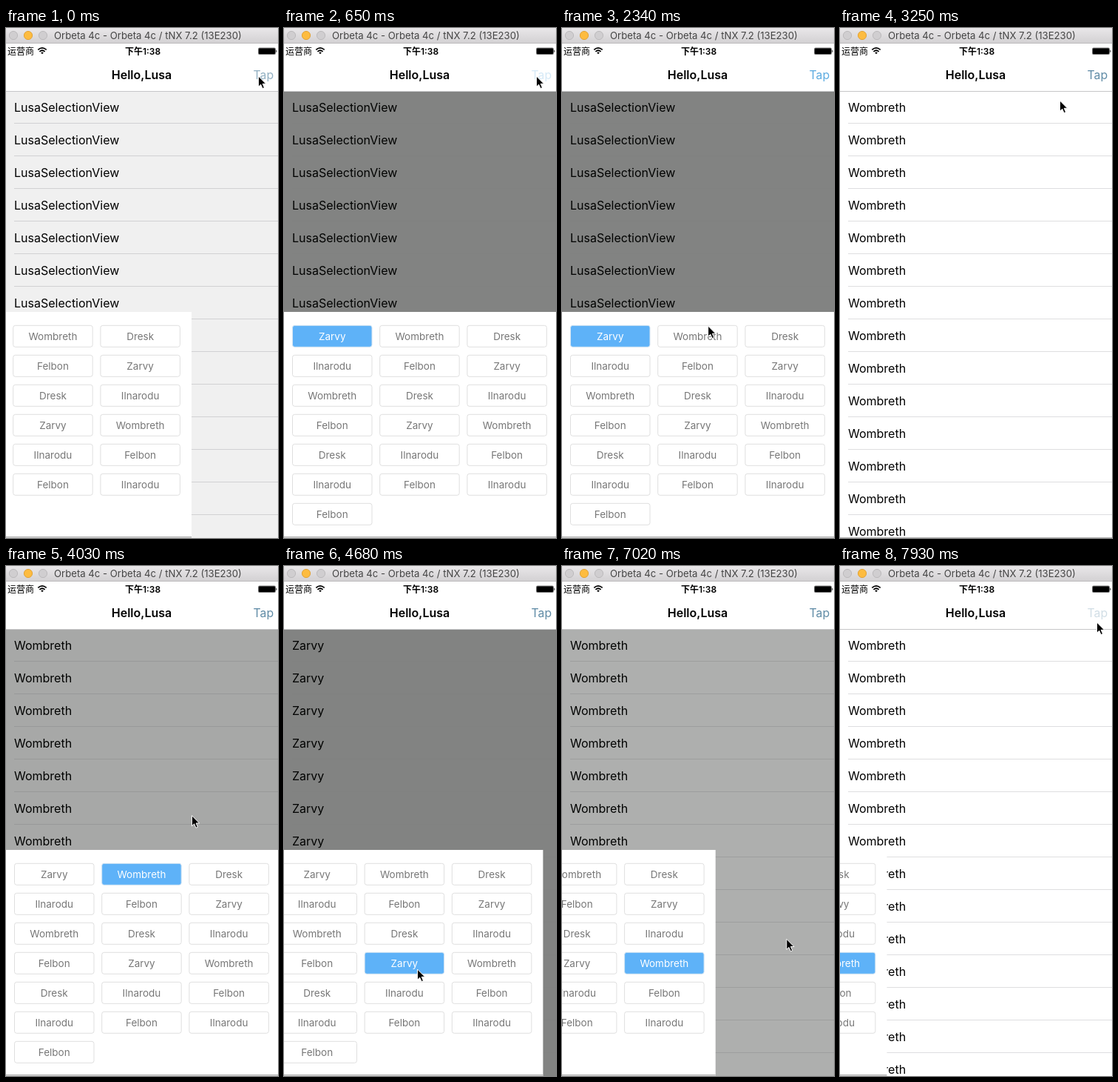
These frames come from a looping animation (368 px wide and 688 px high, 8000 ms). An HTML page:

```html
<!DOCTYPE html>
<html lang="zh">
<head>
<meta charset="utf-8">
<style>
html, body { margin: 0; width: 100%; height: 100%; overflow: hidden; background: #fff; }
svg { display: block; width: 368px; height: 688px; font-family: Inter, "Noto Sans CJK SC", "Noto Sans CJK", sans-serif; }
</style>
</head>
<body>
<svg id="stage" viewBox="0 0 368 688" xmlns="http://www.w3.org/2000/svg">
  <defs>
    <linearGradient id="chrome" x2="0" y2="1">
      <stop stop-color="#e9e7e9"/><stop offset="1" stop-color="#d2d0d2"/>
    </linearGradient>
  </defs>
  <rect width="368" height="688" fill="#fff"/>
  <g id="lines" fill="#dedee0"></g>
  <g id="rows" font-size="16"></g>
  <rect id="dim" y="86" width="368" height="602" fill="#000402"/>
  <rect id="edge" y="687" width="368" height="1" fill="#b4b4b4"/>
  <g id="panel">
    <rect y="383" width="371" height="305" fill="#fff"/>
    <rect y="686" width="371" height="1.5" fill="#adadad"/>
    <g id="cells" font-size="13.5" text-anchor="middle"></g>
  </g>
  <rect y="21" width="368" height="64" fill="#fff"/>
  <rect y="85" width="368" height="1" fill="#c6c6c8"/>
  <rect width="368" height="21" fill="url(#chrome)"/>
  <rect y="20" width="368" height="1" fill="#bdbbbd"/>
  <g stroke-width="1">
    <circle cx="10" cy="10" r="5.6" fill="#d0ced0" stroke="#bcbabc"/>
    <circle cx="30" cy="10" r="5.6" fill="#fdbc40" stroke="#e2a336"/>
    <circle cx="50" cy="10" r="5.6" fill="#d0ced0" stroke="#bcbabc"/>
  </g>
  <text x="65" y="15" font-size="13.15" fill="#454545">Orbeta 4c - Orbeta 4c / tNX 7.2 (13E230)</text>
  <text x="2" y="35.5" font-size="12">运营商</text>
  <g fill="none" stroke="#000" stroke-width="1.7">
    <path d="M43.3 29.4Q49 24.4 54.7 29.4M45.4 31.8Q49 28.7 52.6 31.8"/>
    <path d="M47.2 33.3Q49 31.8 50.8 33.3L49 35.3Z" fill="#000" stroke="none"/>
  </g>
  <text x="185" y="35.5" font-size="12" font-weight="600" text-anchor="middle">下午1:38</text>
  <rect x="341" y="26.5" width="24" height="9.5" rx="2" fill="#777"/>
  <rect x="342" y="27.5" width="22" height="7.5" rx="1"/>
  <path d="M365.4 29.3q2 2 0 4z"/>
  <text x="183.5" y="69" font-size="16" font-weight="600" text-anchor="middle">Hello,Lusa</text>
  <text id="tap" x="334.5" y="69" font-size="15.8">Tap</text>
  <path id="cursor" d="M0 0V14.2L3.2 11.2L5.6 16.6L8 15.5L5.7 10.3H10.2Z" stroke="#fff" stroke-width="1"/>
</svg>
<script>
const LOOP = 8000, SLIDE = 350, TRAVEL = 371;
const [W, D, F, Z, I] = ["Wombreth", "Dresk", "Felbon", "Zarvy", "Ilnarodu"];
const names = [Z, W, D, I, F, Z, W, D, I, F, Z, W, D, I, F, I, F, I, F];

const toggles = [[-216, 1], [690, 0], [1369, 1], [2760, 0], [3560, 1], [4631, 0], [5625, 1], [6860, 0], [7839, 1]];
const presses = [-270, 600, 1330, 3500, 5570, 7790];
const picks = [[-1000, 0, "LusaSelectionView"], [2680, 1, W], [4550, 10, Z], [6780, 11, W]];
const path = [
  [0, 341.5, 65], [1650, 341.5, 65], [2450, 190, 420], [2800, 190, 420],
  [3250, 297.5, 98], [3450, 344, 66], [3650, 344, 66], [4350, 180.5, 544],
  [4700, 180.5, 544], [5400, 344, 66], [5620, 344, 66], [5980, 361.5, 348],
  [6500, 300, 540], [6900, 300, 540], [7600, 347.5, 76], [8000, 347.5, 76]
];

const $ = id => document.getElementById(id);
const clamp = v => Math.min(1, Math.max(0, v));
const smooth = v => (v = clamp(v), v * v * (3 - 2 * v));
const latest = (list, t) => list.filter(e => e[0] <= t).pop();

function add(parent, tag, attrs, text = "") {
  const el = document.createElementNS("http://www.w3.org/2000/svg", tag);
  for (const key in attrs) el.setAttribute(key, attrs[key]);
  el.textContent = text;
  parent.append(el);
  return el;
}

const rows = [];
for (let i = 0; i < 14; i++) {
  add($("lines"), "rect", { x: 11, y: 128 + 44 * i, width: 357, height: 1 });
  rows.push(add($("rows"), "text", { x: 11, y: 112.5 + 44 * i }));
}

const cells = names.map((name, i) => {
  const x = 11.5 + 118.2 * (i % 3), y = 401.3 + 40 * Math.floor(i / 3);
  return {
    box: add($("cells"), "rect", { x, y, width: 107.5, height: 29, rx: 3 }),
    label: add($("cells"), "text", { x: x + 53.75, y: y + 19.2 }, name)
  };
});

function cursorAt(t) {
  const k = path.findIndex(p => p[0] > t);
  const a = path[k - 1], b = path[k];
  const e = smooth((t - a[0]) / (b[0] - a[0]));
  return [1, 2].map(j => a[j] + (b[j] - a[j]) * e);
}

function draw(t) {
  const [start, open] = latest(toggles, t);
  const age = t - start;
  const slide = smooth(age / SLIDE);
  const shown = open ? slide : 1 - slide;
  const shade = open ? clamp((age - 165) / 435) : 1 - clamp((age - 60) / 290);
  $("panel").setAttribute("transform", `translate(${TRAVEL * (shown - 1)} 0)`);
  $("dim").setAttribute("opacity", 0.49 * shade);
  $("lines").setAttribute("opacity", 1 - 0.9 * shade ** 3);
  $("edge").setAttribute("opacity", shown ? 0 : 1);

  const [, selected, title] = latest(picks, t);
  for (const row of rows) row.textContent = title;
  cells.forEach(({ box, label }, i) => {
    const on = i === selected;
    box.setAttribute("fill", on ? "#5eb2f8" : "#fff");
    box.setAttribute("stroke", on ? "#d3e4f2" : "#dfdfdf");
    label.setAttribute("fill", on ? "#fff" : "#777");
  });

  const since = t - presses.filter(p => p <= t).pop();
  $("tap").setAttribute("fill", t > 500 && t < 2680 ? "#5cabe0" : "#5f8ba6");
  $("tap").setAttribute("opacity", 0.25 + 0.75 * clamp((since - 130) / 250));
  $("cursor").setAttribute("transform", `translate(${cursorAt(t)})`);
}

const origin = performance.now();
function tick() {
  draw((performance.now() - origin) % LOOP);
  requestAnimationFrame(tick);
}
tick();
</script>
</body>
</html>
```
